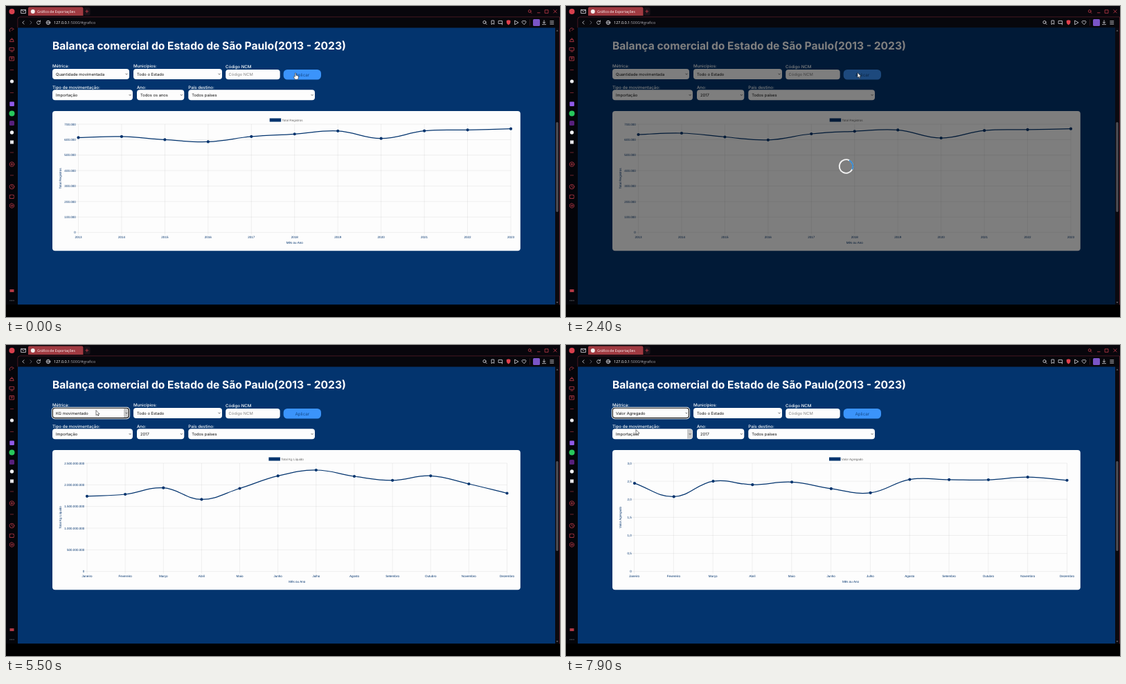
Animation, 800 px wide and 450 px high, one loop 8000 ms. Source, as an HTML page:

```html
<!DOCTYPE html>
<html lang="pt-BR">
<head>
<meta charset="utf-8">
<title>Gráfico de Exportações</title>
<style>
  html, body { margin: 0; width: 100%; height: 100%; overflow: hidden; background: #000; }
  svg { display: block; width: 100vw; height: 100vh; }
  text { font-family: Inter, sans-serif; text-rendering: geometricPrecision; white-space: pre; }
  .ui { font: 5.5px "Open Sans", sans-serif; fill: #a9a9b0; }
  .title { font-size: 15.6px; font-weight: 700; fill: #fff; }
  .label { font-size: 6.15px; font-weight: 500; fill: #fff; }
  .value { font-size: 5.8px; fill: #111; }
  .hint { font-size: 5.8px; fill: #858585; }
  .field { fill: #fdfdfd; }
  .line { fill: none; stroke-width: .8; stroke-linecap: round; stroke-linejoin: round; }
  .red { stroke: #c23c49; }
  .pale { stroke: #dcdce2; }
  .chev { fill: none; stroke: #333; stroke-width: .7; }
  .chart text { font: 4.55px "Liberation Sans", Arial, sans-serif; fill: #03346e; }
  .chart .key { fill: #666; }
  .grid { stroke: #000; stroke-opacity: .12; stroke-width: .5; fill: none; }
  .mid { text-anchor: middle; }
  .end { text-anchor: end; }
</style>
</head>
<body>
<svg viewBox="0 0 800 450">
  <rect width="800" height="450" fill="#000"/>
  <rect width="800" height="432" fill="#08060c"/>
  <rect y="31" width="17" height="401" fill="#04050a"/>

  <!-- tab bar -->
  <circle cx="8.5" cy="8" r="4" fill="#d8404d"/>
  <path class="line pale" d="M22 5.5h6.500v5h-6.500zM22 5.500l3.200 2.600l3.300-2.600"/>
  <path d="M32 14V3.500a2 2 0 0 1 2-2h75.500a2 2 0 0 1 2 2V14z" fill="#a03a41"/>
  <circle cx="38.800" cy="8" r="3" fill="#f4eeee"/>
  <text class="ui" x="45" y="9.800" style="font-size:5.1px;fill:#fff">Gráfico de Exportações</text>
  <rect x="112.500" y="2" width="9" height="11.500" rx="2" fill="#1b1219"/>
  <path class="line red" d="M114.800 7.800h4M116.800 5.800v4M759 10.500l-1.600-1.600M767.500 9.800h3.600M778.500 5.800h4.500v4.500h-4.500zM790.800 5.600l4.400 4.400M795.200 5.600l-4.400 4.400"/>
  <circle class="line red" cx="756.200" cy="7.500" r="1.900"/>
  <path class="line" d="M17 31V19a3 3 0 0 1 3-3H799.500V432" stroke="#6d2530"/>

  <!-- address bar -->
  <path d="M17.500 31V19a2.500 2.500 0 0 1 2.500-2.500H799V31z" fill="#07070c"/>
  <path class="line pale" d="M26 21.800l-2.200 2.200l2.200 2.200M49 22.400a2.500 2.500 0 1 0 .5 2.200M49.500 21v1.700h-1.700"/>
  <path class="line" stroke="#77777f" d="M35 21.800l2.200 2.200l-2.200 2.200"/>
  <g class="line pale" style="stroke-width:.6">
    <circle cx="61" cy="24" r="2.900"/>
    <ellipse cx="61" cy="24" rx="1.300" ry="2.900"/>
    <path d="M58.100 24h5.800"/>
  </g>
  <text class="ui" x="69" y="25.900"><tspan fill="#fff">127.0.0.1</tspan>:5000/#grafico</text>
  <g class="line pale">
    <circle cx="691" cy="23.500" r="2.100"/>
    <path d="M692.600 25.100l1.600 1.600M701.400 21h3.400v5.500l-1.700-1.300l-1.700 1.300zM711.500 21.500h5v4h-5zM716.500 25.500v1.500M735 21.200l5 2.800l-5 2.800zM748 26.600l-2.700-2.700a1.500 1.500 0 0 1 2.700-1.700a1.500 1.500 0 0 1 2.700 1.700zM777 20.800v4M775.400 23.400l1.600 1.600l1.600-1.600M774.500 26.700h5M785.800 21.800h5M785.800 24h5M785.800 26.200h5"/>
  </g>
  <path d="M722.800 21l2.800-.8l2.800.8v3q-.4 2.400-2.800 3.400q-2.400-1-2.800-3.400z" fill="#e0404c"/>
  <path d="M756.500 19.500v9" stroke="#55272f" stroke-width=".6"/>
  <rect x="761" y="19" width="10" height="10" rx="1.500" fill="#7a55c7"/>

  <!-- side bar -->
  <g class="line red">
    <path d="M5.800 37a3.200 3.200 0 1 1 5.400-3.400M8.500 35.200l2-1.600M5.800 51.600h5.400l-1-3h-3.400zM7.300 48.500l1.200-2l1.200 2M5.400 60.400h6.200v3.800h-6.200zM7 66h3M5.500 73.500h6v5.500h-6zM7.200 75.200h2.600M8.500 75.200v2.200"/>
    <path d="M6.300 92.500h4.400M6.300 125.500h4.400M6.300 212h4.400M6.300 245h4.400" stroke-opacity=".7"/>
    <circle cx="8.500" cy="229" r="3.300"/>
    <path d="M8.500 227.500v3M7 229h3"/>
    <circle cx="8.500" cy="261.500" r="3.300"/>
    <path d="M8.500 259.700v2l1.400.8"/>
    <path d="M5.700 273.500h2a1 1 0 0 1 1.800 0h1.700v1.500a1 1 0 0 1 0 1.800v1.700h-5.500z"/>
    <path d="M8.500 285.700l2.900 1.700v3.300l-2.900 1.700l-2.900-1.700v-3.300z"/>
    <circle cx="8.500" cy="289" r="1.100"/>
  </g>
  <circle cx="8.500" cy="109" r="2.600" fill="#ececf0"/>
  <rect x="5.300" y="138.500" width="6.600" height="6.600" rx="1" fill="#8f5ae8"/>
  <circle cx="8.500" cy="155.500" r="4" fill="#27c75c"/>
  <rect x="5" y="166" width="7" height="7" rx="1.500" fill="#57207d"/>
  <circle cx="8.500" cy="183" r="2.700" fill="#f0f0f3"/>
  <rect x="6" y="194.500" width="5" height="5" fill="#e4e4e8"/>
  <rect x="5.500" y="410" width="6" height="4" fill="#b03844"/>
  <path d="M6 426.200h.1M8.500 426.200h.1M11 426.200h.1" class="line pale"/>

  <!-- page -->
  <rect x="17" y="31.500" width="776" height="400.500" fill="#03346e"/>
  <rect x="793" y="31.500" width="6" height="400.500" fill="#0b0a10"/>
  <rect x="794.300" y="168" width="3.200" height="130" rx="1.600" fill="#4d4c54"/>
  <path d="M794.500 36.500l1.500-2l1.500 2zM794.500 428l1.500 2l1.500-2z" fill="#68676f"/>
  <text class="title" x="67" y="63.300">Balança comercial do Estado de São Paulo(2013 - 2023)</text>

  <g id="fields"></g>
  <text class="label" x="317" y="90">Código NCM</text>
  <rect class="field" x="317.200" y="92" width="78.500" height="14.300" rx="4"/>
  <text class="hint" x="321.500" y="101.200">Código NCM</text>
  <rect x="400.700" y="92" width="54.300" height="14.500" rx="5.500" fill="#3b94fb"/>
  <text class="mid" x="427.800" y="101.600" font-size="6.300" fill="#164b8b">Aplicar</text>
  <g id="ring" fill="none">
    <rect x="66.500" y="90.500" width="111.800" height="15.900" rx="4" stroke="#fff" stroke-width="1.500"/>
    <rect x="67.300" y="91.300" width="110.200" height="14.300" rx="3.500" stroke="#0a0a0a" stroke-width="1.100"/>
  </g>

  <rect x="67" y="152" width="675.800" height="202.300" rx="4" fill="#fdfdfd"/>
  <g class="chart">
    <g id="axes"></g>
    <path id="curve" fill="none" stroke="#03346e" stroke-width="1.250"/>
    <path id="dots" fill="none" stroke="#03346e" stroke-width="4.200" stroke-linecap="round"/>
  </g>

  <g id="loading">
    <rect x="17" y="31.500" width="776" height="400.500" fill="#000" fill-opacity=".5"/>
    <g id="spinner" fill="none" stroke-width="1.900">
      <circle cx="404.500" cy="232" r="9.800" stroke="#f3f3f3"/>
      <path d="M397.570 225.070a9.800 9.800 0 0 1 13.860 0" stroke="#2f86cf"/>
    </g>
  </g>

  <path id="arrow" d="M0 0V7.200L1.700 5.700L2.800 8.200L4 7.700L2.900 5.300H5.100Z" fill="#fff" stroke="#111" stroke-width=".55"/>
  <path id="hand" d="M-.8 .6a.8.8 0 0 1 1.600 0V3.500q.7-.5 1.300.2q.8-.4 1.200.4q1-.1 1 .9V6.500q0 1.600-1 2.700H-.6Q-1.800 7.500-2.600 5.700q-.4-1 .5-1.100q.8 0 1.300 1z" fill="#fff" stroke="#111" stroke-width=".55"/>
</svg>

<script>
const LOOP = 8000, TOP = 171, BOTTOM = 327.7;
const $ = id => document.getElementById(id);
const show = (el, on) => el.setAttribute('visibility', on ? 'visible' : 'hidden');

// Select boxes: hover holds [start, end] times
const fields = [
  { label: 'Métrica:', x: 67, y: 91, w: 111, hover: [[3150, 4560], [4850, 7380]],
    text: [[0, 'Quantidade movimentada'], [4500, 'KG movimentado'], [6400, 'Valor FOB'], [7300, 'Valor Agregado']] },
  { label: 'Municípios:', x: 184, y: 91, w: 128, hover: [], text: [[0, 'Todo o Estado']] },
  { label: 'Tipo de movimentação:', x: 67, y: 121.3, w: 116, hover: [[7600, LOOP]], text: [[0, 'Importação']] },
  { label: 'Ano:', x: 189, y: 121.3, w: 68.3, hover: [[800, 1480]], text: [[0, 'Todos os anos'], [1400, '2017']] },
  { label: 'País destino:', x: 263.3, y: 121.3, w: 182.7, hover: [], text: [[0, 'Todos países']] }
];

$('fields').innerHTML = fields.map(({ label, x, y, w }) => `<g>
  <text class="label" x="${x}" y="${y - 1.6}">${label}</text>
  <rect class="field" x="${x}" y="${y}" width="${w}" height="15" rx="4"/>
  <path class="hover" d="M${x + w - 8} ${y + .7}h4.500q3 0 3 3v7.600q0 3-3 3h-4.500z" fill="#c9c9c9"/>
  <path class="chev" d="M${x + w - 5.4} ${y + 6.7}l1.500 1.500l1.500-1.500"/>
  <text class="value" x="${x + 5}" y="${y + 9.6}"></text></g>`).join('');
[...$('fields').children].forEach((g, i) => {
  fields[i].value = g.querySelector('.value');
  fields[i].shade = g.querySelector('.hover');
});

const years = Array.from({ length: 11 }, (_, i) => 2013 + i);
const months = ['Janeiro', 'Fevereiro', 'Março', 'Abril', 'Maio', 'Junho', 'Julho', 'Agosto',
  'Setembro', 'Outubro', 'Novembro', 'Dezembro'];

// ys are heights on the stage; key is the left edge of the legend
const charts = [
  { at: -1000, time: 1, names: years, left: 104.5, right: 729, max: 7e5, steps: 7, key: 380.7, legend: 'Total Registros',
    ys: [190.5, 189, 193.5, 196.4, 189, 185.3, 180.8, 191.7, 180.7, 179.3, 177.7] },
  { at: 0, time: 500, names: years, left: 104.5, right: 729, max: 7e5, steps: 7, key: 380.7, legend: 'Total Registros',
    ys: [186, 184, 189.5, 193.8, 185, 181.3, 179.4, 191, 180.2, 178.9, 177.7] },
  { at: 2600, time: 1000, names: months, left: 102, right: 723.5, max: 6e4, steps: 6, key: 380.7, legend: 'Total Registros',
    ys: [193, 202.8, 183.4, 196, 186.7, 187.5, 190, 180, 186.5, 183.1, 185.3, 193.3] },
  { at: 4500, time: 1000, names: months, left: 117, right: 723.5, max: 2.5e9, steps: 5, key: 379.4, legend: 'Total Kg Líquido',
    ys: [218.8, 216, 206.7, 223.4, 207.5, 189.4, 181, 190, 195.8, 189.3, 201, 214.5] },
  { at: 6400, time: 1000, names: months, left: 117, right: 723.5, max: 6e9, steps: 6, key: 385, legend: 'Valor FOB', side: 'Valor Fob',
    ys: [213.6, 229, 200.5, 219.3, 202.5, 198.3, 198.8, 184.4, 189, 184, 189.7, 206.3] },
  { at: 7300, time: 1000, names: months, left: 98.5, right: 723.5, max: 3, steps: 6, key: 380, legend: 'Valor Agregado',
    ys: [199.7, 219.2, 197, 201.7, 198.2, 208.2, 214.3, 194.8, 195, 195.3, 191.2, 195.5] }
];

const number = (n, max) => !n ? '0' : max < 10 ? n.toFixed(1).replace('.', ',')
  : String(Math.round(n)).replace(/\B(?=(\d{3})+$)/g, '.');
const xAt = (c, i) => c.left + (c.right - c.left) * i / (c.names.length - 1);

function drawAxes(c) {
  let grid = '', text = '';
  c.names.forEach((name, i) => {
    const x = xAt(c, i);
    grid += `M${x} ${TOP}V${BOTTOM + 3}`;
    text += `<text class="mid" x="${x}" y="336.300">${name}</text>`;
  });
  for (let i = 0; i <= c.steps; i++) {
    const y = BOTTOM + (TOP - BOTTOM) * i / c.steps;
    grid += `M${c.left - 3} ${y}H${c.right}`;
    text += `<text class="end" x="${c.left - 3.7}" y="${y + 1.6}">${number(c.max * i / c.steps, c.max)}</text>`;
  }
  $('axes').innerHTML = `<path class="grid" d="${grid}"/>${text}
    <text class="mid" x="${(c.left + c.right) / 2}" y="344.200">Mês ou Ano</text>
    <text class="mid" transform="translate(79.800 249.500) rotate(-90)">${c.side || c.legend}</text>
    <rect x="${c.key}" y="162.500" width="16.500" height="5" fill="#03346e"/>
    <text class="key" x="${c.key + 17.8}" y="166.600">${c.legend}</text>`;
}

// Smooth line through the points with tension 0.4
function curvePath(p) {
  const handles = p.map(([x, y], i) => {
    const a = p[i - 1] || p[i], b = p[i + 1] || p[i];
    const d1 = Math.hypot(x - a[0], y - a[1]), d2 = Math.hypot(b[0] - x, b[1] - y);
    const k1 = .4 * d1 / (d1 + d2), k2 = .4 * d2 / (d1 + d2);
    const dx = b[0] - a[0], dy = b[1] - a[1];
    return [[x - k1 * dx, y - k1 * dy], [x + k2 * dx, y + k2 * dy]];
  });
  return 'M' + p[0] + p.slice(1).map((q, i) => `C${handles[i][1]} ${handles[i + 1][0]} ${q}`).join('');
}

function pointsAt(n, t) {
  const c = charts[n], prev = charts[n - 1];
  const rest = (1 - Math.min(1, (t - c.at) / c.time)) ** 4;
  return c.ys.map((y, i) => {
    const x = xAt(c, i);
    const known = prev && i < prev.ys.length;
    const fromX = known ? xAt(prev, i) : x, fromY = known ? prev.ys[i] : BOTTOM;
    return [x + (fromX - x) * rest, y + (fromY - y) * rest];
  });
}

// Pointer tip: time, x, y
const path = [
  [0, 418, 97], [250, 418, 97], [900, 222, 128], [1050, 221, 130], [1300, 204, 197.5], [1420, 204, 196],
  [1750, 421, 96.5], [2750, 421, 96.5], [3250, 104, 97], [3350, 103, 99], [3600, 101, 146.5], [3900, 101, 140],
  [4300, 104, 121], [4550, 104, 121], [5000, 130, 94.5], [5800, 130, 94.5], [6200, 114, 131], [6450, 114, 131],
  [6800, 112, 97.5], [7120, 112, 97.5], [7270, 108, 140], [7400, 107, 140], [7800, 101, 122.5], [LOOP, 101, 122.5]
];

function pointerAt(t) {
  const i = Math.max(1, path.findIndex(p => p[0] > t));
  const [t0, x0, y0] = path[i - 1], [t1, x1, y1] = path[i];
  const u = (t - t0) / (t1 - t0), e = u * u * (3 - 2 * u);
  return [x0 + (x1 - x0) * e, y0 + (y1 - y0) * e];
}

let drawn = -1;
function render(t) {
  const n = charts.findLastIndex(c => c.at <= t);
  if (n !== drawn) drawAxes(charts[drawn = n]);
  const points = pointsAt(n, t);
  $('curve').setAttribute('d', curvePath(points));
  $('dots').setAttribute('d', points.map(p => `M${p}h.01`).join(''));

  for (const f of fields) {
    const text = f.text.findLast(s => s[0] <= t)[1];
    if (f.value.textContent !== text) f.value.textContent = text;
    show(f.shade, f.hover.some(([a, b]) => t >= a && t < b));
  }
  show($('ring'), t >= 4500);

  const busy = t >= 1800 && t < 2600;
  show($('loading'), busy);
  $('spinner').setAttribute('transform', `rotate(${(t - 2200) * .36} 404.5 232)`);

  const [x, y] = pointerAt(t);
  const onButton = !busy && x > 400.7 && x < 455 && y > 92 && y < 106.5;
  show($('arrow'), !onButton);
  show($('hand'), onButton);
  for (const id of ['arrow', 'hand']) $(id).setAttribute('transform', `translate(${x} ${y})`);
}

const start = performance.now();
function tick() {
  render((performance.now() - start) % LOOP);
  requestAnimationFrame(tick);
}
tick();
</script>
</body>
</html>
```
